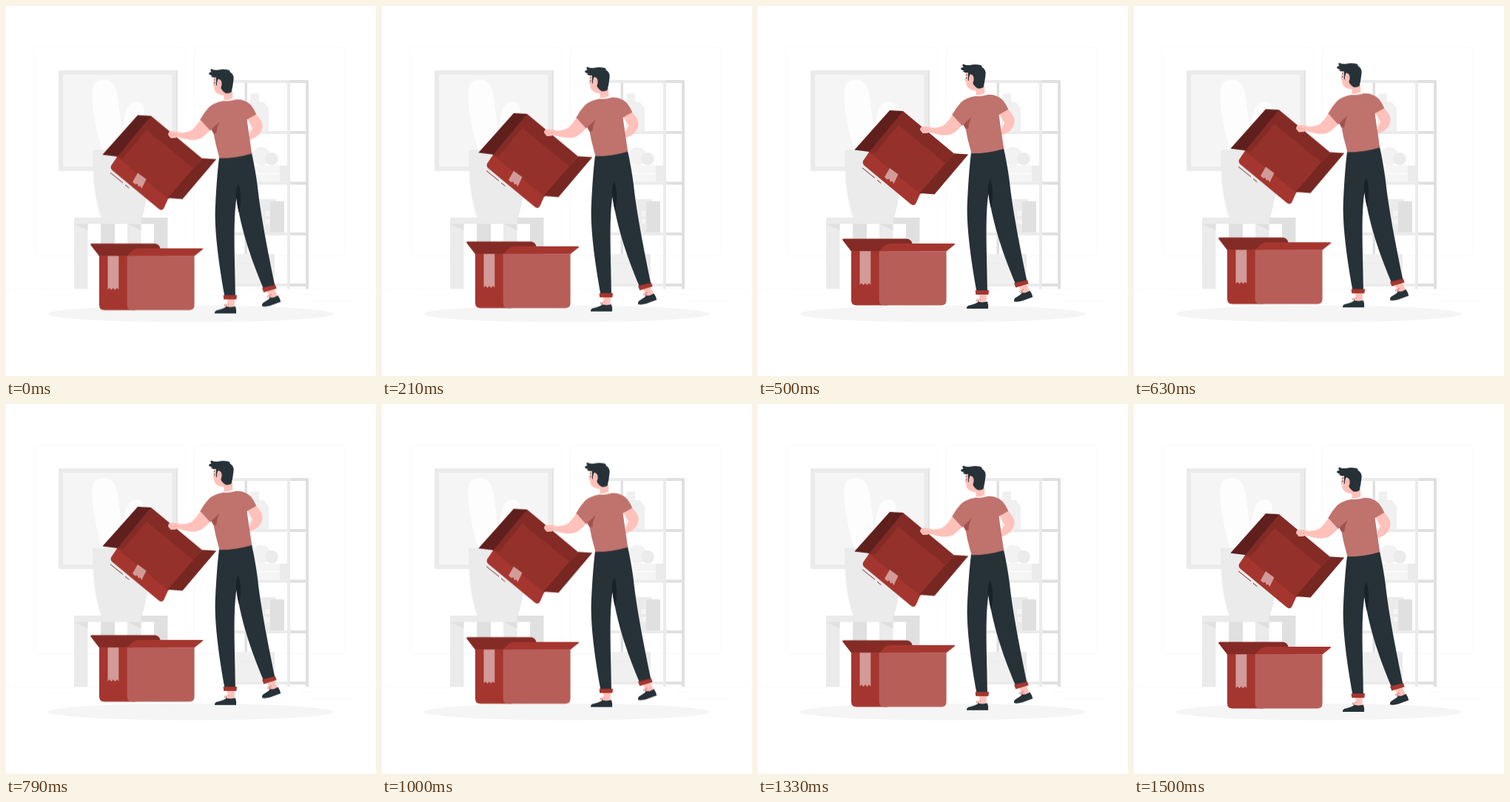
These frames come from a looping animation (500 px wide and 500 px high, 1540 ms). An HTML page:

```html
<!DOCTYPE html>
<html lang="en">
<head>
<meta charset="utf-8">
<title>Unpacking</title>
<style>
  html, body { margin: 0; width: 100%; height: 100%; overflow: hidden; background: #fff; }
  svg { display: block; width: 100vw; height: 100vh; }
  .float { animation: float 1540ms linear -40ms infinite; }
  @keyframes float { 50% { transform: translateY(-10px); } }
  .pale { fill: #f5f5f5; }
  .light { fill: #ebebeb; }
  .mid { fill: #e0e0e0; }
  .red { fill: #a5362f; }
  .red-soft { fill: #b75e59; }
  .red-dark { fill: #842b26; }
  .tape { fill: #d29b97; }
  .shirt { fill: #c0726d; }
  .skin { fill: #ffc1ba; }
  .ink { fill: #263238; }
</style>
</head>
<body>
<svg viewBox="0 0 500 500">
  <!-- room -->
  <g fill="none" stroke="#ebebeb" stroke-width=".25">
    <rect x="38.8" y="55.1" width="204" height="282.6" rx="5.6"/>
    <rect x="254.6" y="55.1" width="204" height="282.6" rx="5.6"/>
    <path d="M0 382.5H500M416.8 398.6h51M322.5 401.3h8.7M396.6 389.3h19.2M52.5 391h43.2M104.6 391h6.3M131.5 395.2h93.7"/>
  </g>

  <!-- picture and plant -->
  <path class="mid" d="M73 87h159v135.5H73z"/>
  <path class="light" d="M71 87h159.5v135.5H71z"/>
  <path class="pale" d="M77 93h147.5v124H77z"/>
  <g fill="#fdfdfd">
    <path d="M131 199C123 172 116 143 116.300 117C117 104 124 99 133 99.500C143 100 149 109 151 122C154 145 158 174 160 199z"/>
    <path d="M158 199C157 170 157 129 176 129C185 129 188 137 186.500 147C184 165 177 180 176 199z"/>
  </g>
  <path class="light" d="M120 194.500H192Q195 194.500 195 198C195 233 192 260 183.500 287H128.500C120 260 117 233 117 198Q117 194.500 120 194.500z"/>

  <!-- table -->
  <path class="mid" d="M128 294h19v88h-19zM200 294h18.500v88H200zM182 286h36.500v8.500H182z"/>
  <path class="light" d="M92 286h90.500v96H164v-87.500h-53.500V382H92z"/>
  <path class="mid" d="M92.500 294.500h18v9zM164 294.500h18.500v9z"/>

  <!-- shelf -->
  <path class="mid" d="M322.500 102h3.500v277h-3.500z"/>
  <g class="pale">
    <path fill="#f0f0f0" d="M330.500 118.500h11.500v9.500q2 2 2 5V169H329v-38q0-2 1.500-3zM343 130h6.500q0 4 3 5q2.500 1 2.500 5v29h-13z"/>
    <circle cx="345" cy="203" r="12.500" fill="#f2f2f2"/>
    <circle class="light" cx="359" cy="206.500" r="8.800"/>
    <path d="M320 215.500h50V226h-50zM320 227h50v10.500h-50z"/>
    <path class="light" d="M370 215.500h10.500v22H370zM337 261h27.500v3.500H337zM334 264.500h23V306h-23z"/>
    <path class="mid" d="M357 264h19v42h-19z"/>
    <path d="M350.500 277h6v7h-6zM350.500 288h6v6.500h-6zM340 264.500h2v41.500h-2z"/>
    <path fill="#f0f0f0" d="M308 335h55v40h-55z"/>
    <path class="light" d="M347 335h16v40h-16zM308 347.500h39v1h-39z"/>
  </g>
  <path class="mid" d="M405 100h4v282h-4zM384 100h25v4h-25zM384 169h25v4h-25zM384 237.500h25v4h-25zM384 306h25v4h-25zM384 375h25v4h-25z"/>
  <path class="light" d="M380 100h4v282h-4zM299 100h85v4h-85zM299 169h85v4h-85zM299 237.500h85v4h-85zM299 306h85v4h-85zM299 375h85v4h-85z"/>

  <ellipse class="pale" cx="249.500" cy="416" rx="193.500" ry="11.300"/>

  <g class="float">
    <!-- open box -->
    <path class="red-dark" d="M126 338.500L114.400 323.500Q113.500 321.600 116 321.500H200Q208 321.500 209 330L218 338.500z"/>
    <path class="red" d="M126 338H175V411.500H133Q126 411.500 126 404.500z"/>
    <path class="red" d="M163.500 338.500L170.500 331.500Q174 328 180 328H265Q267.500 328 265.500 329.800L254.500 338.500z"/>
    <path class="red-soft" d="M163.700 338.300H254.600V404.500Q254.600 411.500 247.600 411.500H170.700Q163.700 411.500 163.700 404.500z"/>
    <path class="tape" d="M137.500 338.300h14.800v45.500l-2.500-2.300-2.400 2.700-2.500-2.700-2.500 2.700-2.400-2.700-2.500 2.300z"/>

    <!-- carried box -->
    <path class="red" d="M151 203L219.500 260L213.500 273.500Q211 278 206.500 274.800L143.500 222.500Q140.500 219.500 142.200 216z"/>
    <path class="red-dark" d="M196 149L265 206.500L219.500 261L150 204z"/>
    <path fill="#95312b" d="M189.800 168L254 220.500L219.500 261L150 204z"/>
    <path fill="#852b26" d="M196 149L189.800 168L158 206L150 204z"/>
    <path fill="#5f1f1c" d="M130.300 201.500L178 148L196.300 149L150.500 204z"/>
    <path fill="#762722" d="M265 206.300L284.300 207.500L238.500 261.500L218.500 260z"/>
    <path class="tape" d="M178 226L189.500 234.500L183.300 247.300L181.500 243.800L178.800 244.500L177.500 240.800L174.500 241.500L171 238.200z"/>
    <path fill="none" stroke="#6e2723" d="M141 225.800L158 239.500M161 242.200L166.300 246.500"/>

    <!-- far arm -->
    <path class="skin" d="M337 145.500C342 151 346 156 346.500 161C347 168 343 174 338 177.500Q333 180.500 328.300 181.500Q328.500 172 333.500 165.500L325.500 152z"/>

    <!-- legs -->
    <path class="skin" d="M299 396h10l-.5 12h-8.500zM353 386l9-4 5 10-9 5z"/>
    <path class="ink" d="M282 416Q281.500 411.800 287 411.200Q294 410 298 406.600L303 407.500L310 406.500Q311.800 411 311 416z"/>
    <path class="ink" d="M346 406.300Q345.300 402 350 400Q355 397.500 357 394.500L361.500 394.500L367.500 391.800Q370.500 396 371.300 400.300L357 405.500Q351 407.300 346 406.300z"/>
    <path fill="none" stroke="#b75e59" stroke-width=".7" d="M298 406.500q-5-1-2-3q2 0 2 3q1-5 3-3M357 394.500q-5 0-3-3q2 0 3 3q-1-5 2-4"/>
    <path class="ink" d="M288 205.500L332 199C335 213 338 229 340 245C344 283 355 338 363.500 379L348.500 383.500C334 349 318 307 311.500 260C306.500 292 309.500 344 310 393H295.500C288 352 282 308 282.700 277C284 248 285.500 226 288 205.500z"/>
    <path fill="#17222a" d="M314 240Q309 251 311.500 262Q313 274 315 280Q319.500 257 314 240z"/>
    <path class="red" d="M293.600 391.300H312.200L311.300 397H294.300zM346 381.500L364 377.300L365.700 382.200L348.300 387.500z"/>

    <!-- head -->
    <path class="skin" d="M294.500 115L306 114L306.500 128Q300 132 294.500 129z"/>
    <path class="skin" d="M281.500 94C280.500 99 281 103 279.600 107.500Q279.700 109 281.200 109.200Q281 116 285.500 118.500Q290 121.500 297 121.500L302 106L292 92z"/>
    <path class="ink" d="M273.700 92Q275 89.500 277.700 89.500Q275 87 277.500 85.500Q281 87.500 286 87Q293 85.500 299 86.500Q303.500 87.500 302.500 89.500Q308.500 93 307.500 100Q306.500 110 304.500 117Q300.500 119 297 118.500Q293 116 290.800 112.500L288 99L286 100L285.200 108L283.800 107.500L284 97Q278 97.500 277 95Q278 94.500 279 94.500Q275.500 94 273.700 92z"/>
    <ellipse class="skin" cx="288.300" cy="105.800" rx="3.300" ry="6"/>
    <path fill="none" stroke="#e99b93" stroke-width=".7" d="M287 104q2-1 2 2"/>
    <path fill="none" stroke="#263238" stroke-width="1" d="M281 100.500l1.500-.7M281.800 103.500v1.800"/>

    <!-- torso -->
    <path fill="#f9f3f2" d="M294 127Q300 128 307 124.500L308 129H293z"/>
    <path class="shirt" d="M294 128.800C302 129.800 306 127.800 311 126.800C319 126.200 326 129.500 331 134.500Q335.500 140 338.300 146.800L325.500 154L332.200 200Q310 206.500 288.500 206.300Q282.500 186 279.300 166L275.500 169L262.200 154.300Q267 145 274.500 137Q281 131 294 128.800z"/>
    <path fill="#a1524d" d="M277.300 167.200L289 156.500Q284.500 164 284.500 172.500L280.500 173z"/>

    <!-- near arm and hand -->
    <path class="skin" d="M262.800 154.500L275.500 168.500Q269 176 262 180Q256 182 249 181.500Q240 180.500 232 177.500Q229 179.500 222.500 179L219 174.500Q219.500 169.500 222.500 170Q231 169.300 235 171.500Q246 172 252 167.500Q257.500 162 262.800 154.500z"/>
    <path fill="none" stroke="#e99b93" stroke-width=".6" d="M222.500 171.500l1.500 5M225 174.500h6"/>
  </g>
</svg>
</body>
</html>
```
